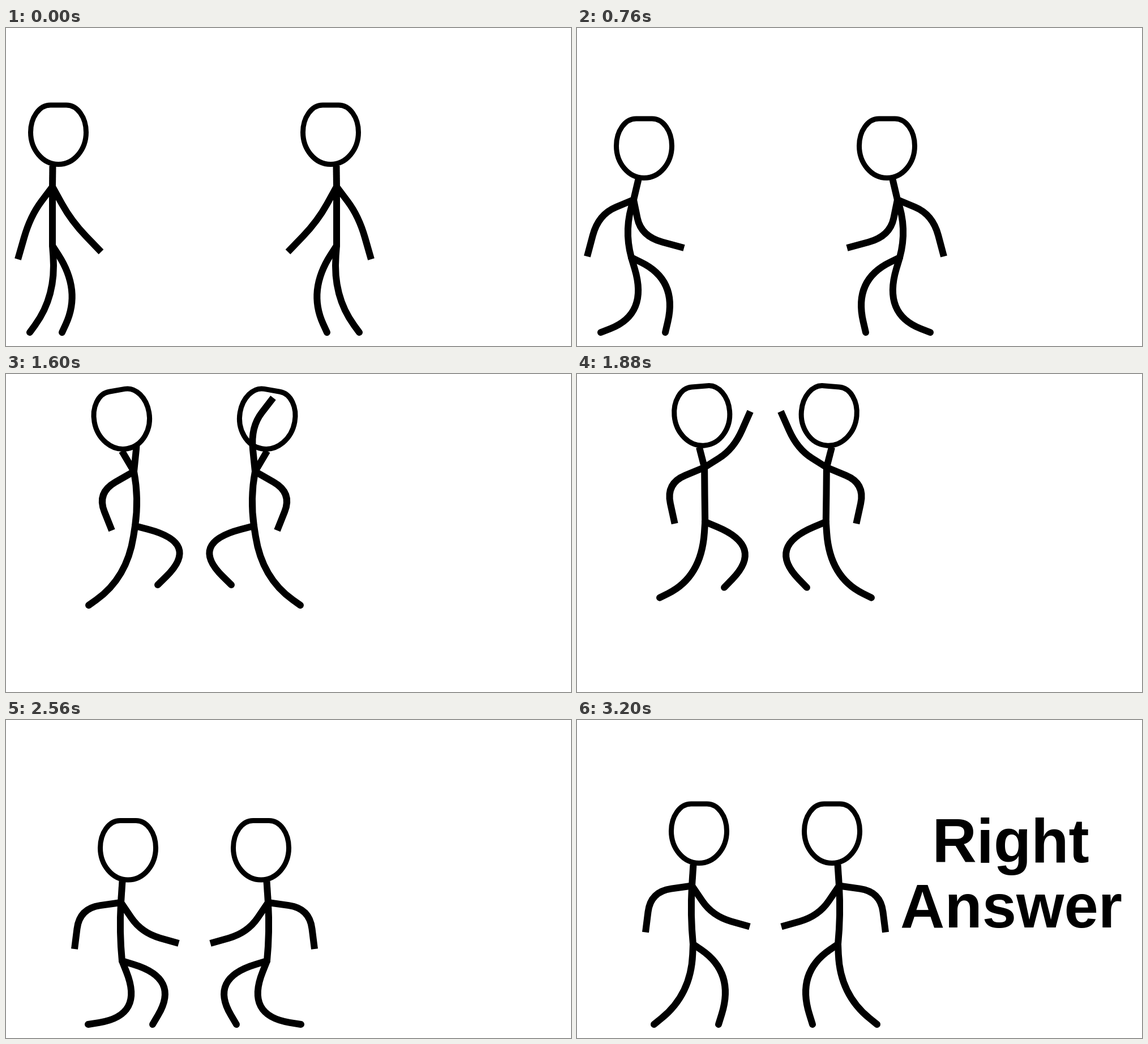
An HTML page with a canvas that plays this animation: 998 px wide and 561 px high, repeating every 3760 ms.

```html
<!DOCTYPE html>
<html lang="en">
<head>
<meta charset="utf-8">
<title>High five</title>
<style>
  html, body { margin: 0; width: 100%; height: 100%; overflow: hidden; background: #fff; }
  canvas { display: block; }
</style>
</head>
<body>
<canvas id="stage" width="998" height="561"></canvas>
<script>
const ctx = document.getElementById('stage').getContext('2d');
const FRAME_MS = 40, FRAMES = 94, TEXT_FRAME = 80, MIRROR_X = 666;

const headShape = new Path2D('M-14-52H14C34-52 49-30 49-4C49 26 28 52.5 0 52.5' +
  'C-28 52.5-49 26-49-4C-49-30-34-52-14-52Z');

// Arms are given relative to the shoulder and kept as angle and length, so they swing.
const polar = (ex, ey, hx, hy) =>
  [Math.atan2(ey, ex), Math.hypot(ex, ey), Math.atan2(hy, hx), Math.hypot(hx, hy)];

// head: x, y, tilt; torso: shoulder, bow, hip; legs: knee, foot
const pose = (head, torso, backArm, frontArm, backLeg, frontLeg) => ({
  head, torso, backArm: polar(...backArm), frontArm: polar(...frontArm), backLeg, frontLeg
});

const stand = pose([92.5, 188, 0], [82, 280, 0, 82, 384],
  [-37, 55, -61, 128], [36, 60, 86, 115], [78, 468, 42, 537], [116, 462, 99, 537]);
const crouch = pose([118.5, 212, 0], [100, 303, -8, 96, 405],
  [-57, 32, -82, 100], [21, 59, 89, 85], [103, 491, 42, 537], [157, 455, 156, 537]);
const leap = pose([162.5, 163.5, 0], [148, 258, -8, 139, 355],
  [-59, 26, -80, 94], [64, 12, 110, -34], [174, 434, 109, 469], [190, 428, 153, 491]);
const windUp = pose([205, 80, -10], [226, 172, 4, 228, 268],
  [-54, 41, -39, 104], [2, -75, -32, -130], [203, 351, 146, 408], [305, 307, 268, 372]);
const drop = pose([252.5, 116, 7], [223, 206, -10, 222, 302],
  [-62, 15, -82, 81], [65, 12, 97, -43], [212, 390, 146, 428], [273, 369, 241, 440]);
const land = pose([215.5, 229.5, 0], [203, 322, -2, 205, 425],
  [-65, 18, -82, 82], [40, 49, 102, 72], [216, 505, 145, 537], [277, 466, 259, 537]);

const mapPose = (p, fn) => Object.fromEntries(
  Object.entries(p).map(([part, values]) => [part, values.map((v, i) => fn(v, part, i))]));

const lift = (p, dy) => {
  const vertical = { head: [1], torso: [1, 4], backLeg: [1, 3], frontLeg: [1, 3] };
  return mapPose(p, (v, part, i) => vertical[part]?.includes(i) ? v - dy : v);
};

const slap = {
  ...lift(mapPose(windUp, (v, part, i) => (v + drop[part][i]) / 2), 25),
  frontArm: polar(56, -12, 105, -64)
};
const rest = {
  ...lift(land, 29.5),
  backLeg: [189, 477, 136, 537], frontLeg: [258, 454, 250, 537]
};

const keys = [[10, stand], [19, crouch], [33, leap], [40, windUp],
  [50, slap], [55, drop], [64, land], [80, rest]];

// Smooth interpolation that never overshoots a key.
function poseAt(frame) {
  if (frame <= keys[0][0]) return stand;
  if (frame >= keys.at(-1)[0]) return rest;
  const k = keys.findIndex(key => key[0] > frame) - 1;
  const [start, from] = keys[k], [end, to] = keys[k + 1];
  const span = end - start, s = (frame - start) / span;

  return mapPose(from, (a, part, i) => {
    const slope = n => (keys[n + 1][1][part][i] - keys[n][1][part][i]) / (keys[n + 1][0] - keys[n][0]);
    const tangent = n => {
      if (n === 0 || n === keys.length - 1) return 0;
      const before = slope(n - 1), after = slope(n);
      return before * after > 0 ? 2 * before * after / (before + after) : 0;
    };
    const b = to[part][i], ease = s * s * (3 - 2 * s);
    return a + (b - a) * ease
      + span * s * (1 - s) * ((1 - s) * tangent(k) - s * tangent(k + 1));
  });
}

// A limb passing through its joint; roundness 0..1 is how much of it bends.
function limb(start, joint, end, roundness, cap) {
  const corner = joint.map((j, i) => (j - roundness / 4 * (start[i] + end[i])) / (1 - roundness / 2));
  const toward = p => corner.map((c, i) => c + roundness * (p[i] - c));
  ctx.lineCap = cap;
  ctx.beginPath();
  ctx.moveTo(...start);
  ctx.lineTo(...toward(start));
  ctx.quadraticCurveTo(...corner, ...toward(end));
  ctx.lineTo(...end);
  ctx.stroke();
}

function drawHead([x, y, tilt]) {
  ctx.save();
  ctx.translate(x, y);
  ctx.rotate(tilt * Math.PI / 180);
  ctx.lineWidth = 9;
  ctx.fillStyle = '#fff';
  ctx.fill(headShape);
  ctx.stroke(headShape);
  ctx.restore();
}

function drawBody(p) {
  const [sx, sy, bow, hx, hy] = p.torso, shoulder = [sx, sy], hip = [hx, hy];
  const [x, y, tilt] = p.head, c = Math.cos(tilt * Math.PI / 180), s = Math.sin(tilt * Math.PI / 180);
  ctx.lineWidth = 12;
  ctx.lineCap = 'butt';
  ctx.beginPath();
  ctx.moveTo(x - 10 * c - 55 * s, y + 55 * c - 10 * s);
  ctx.lineTo(...shoulder);
  ctx.stroke();
  limb(shoulder, [(sx + hx) / 2 + bow, (sy + hy) / 2], hip, 1, 'butt');
  for (const [ea, er, ha, hr] of [p.backArm, p.frontArm]) {
    const reach = (angle, r) => [sx + r * Math.cos(angle), sy + r * Math.sin(angle)];
    limb(shoulder, reach(ea, er), reach(ha, hr), 0.5, 'butt');
  }
  for (const [kx, ky, fx, fy] of [p.backLeg, p.frontLeg]) {
    limb(hip, [kx, ky], [fx, fy], 0.8, 'round');
  }
}

function draw(frame) {
  const p = poseAt(frame);
  ctx.fillStyle = '#fff';
  ctx.fillRect(0, 0, 998, 561);
  ctx.strokeStyle = '#000';
  ctx.lineJoin = 'round';

  drawBody(p);
  drawHead(p.head);

  ctx.save();
  ctx.transform(-1, 0, 0, 1, MIRROR_X, 0);
  drawHead(p.head);
  drawBody(p);
  ctx.restore();

  if (frame >= TEXT_FRAME) {
    ctx.fillStyle = '#000';
    ctx.font = 'bold 108.5px "Liberation Sans", Arial, sans-serif';
    ctx.textAlign = 'center';
    ctx.fillText('Right', 766, 251);
    ctx.fillText('Answer', 767, 365.5);
  }
}

const began = performance.now();
function tick() {
  const elapsed = performance.now() - began;
  draw(Math.floor(elapsed / FRAME_MS) % FRAMES);
  requestAnimationFrame(tick);
}
tick();
</script>
</body>
</html>
```
